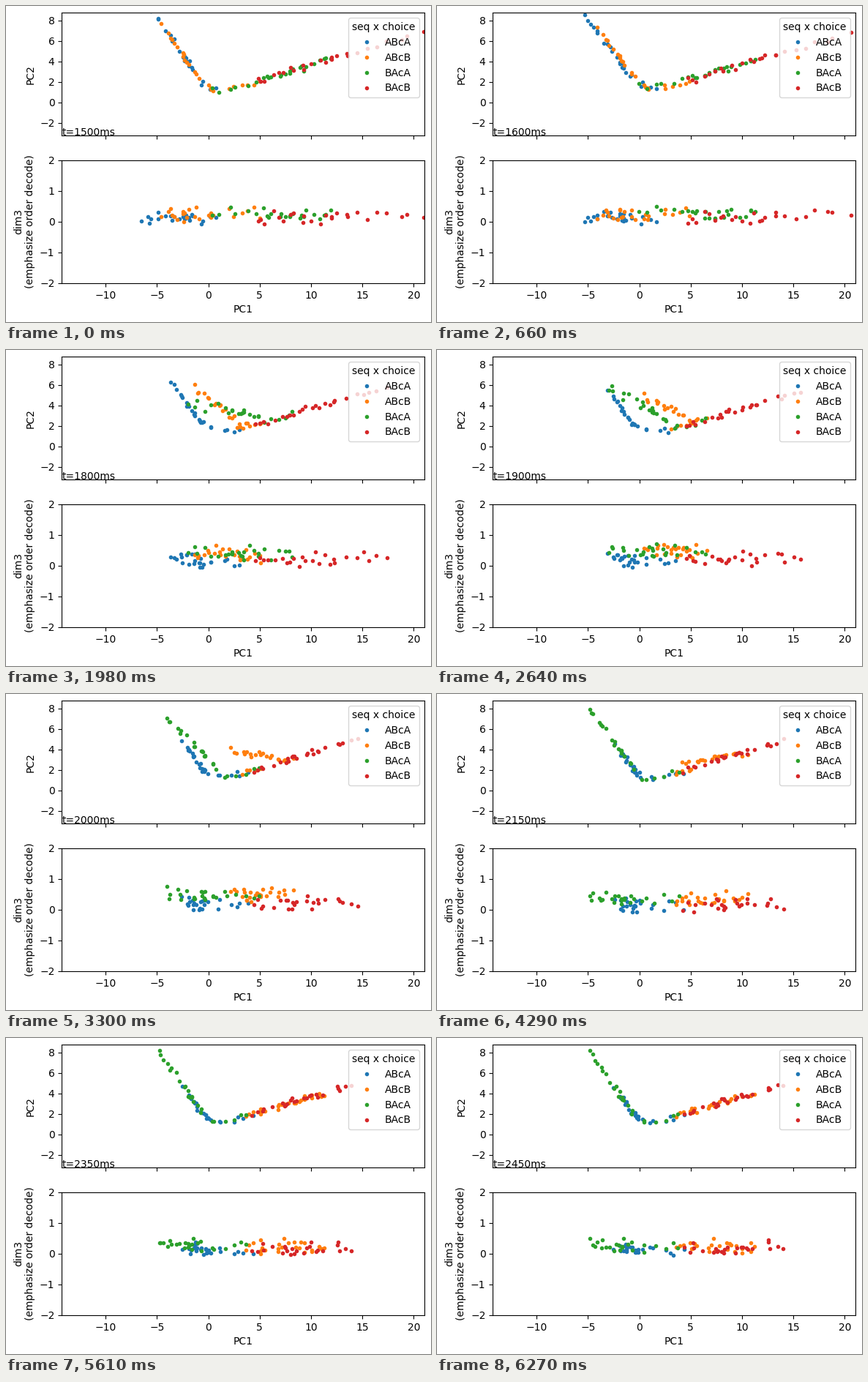
A matplotlib script that plays this animation: 581x432 px, repeating every 7.6 s.

```python
import numpy as np
import matplotlib.pyplot as plt
from matplotlib.animation import FuncAnimation

W, H = 581, 432
TICK, HOLD, LOOP = 40, 330, 7600
STEPS = 20
COUNT = 25  # points per group

rng = np.random.default_rng(7)
steps = np.arange(STEPS)[:, None]


def smooth(p):
    return p * p * (3 - 2 * p)


def ease_out(p):
    return 1 - (1 - p) ** 2


def valley(x):
    """Steep left arm and gentle right arm, blended into one curve."""
    soft = 0.65
    left, right = 1.2 - 1.4 * x, 0.75 + 0.29 * x
    return soft * np.logaddexp(left / soft, right / soft)


def spread(quartiles):
    """Points spaced along five quartiles, with a little scatter inside."""
    u = np.linspace(0, 4, COUNT)
    jitter = rng.normal(0, 0.3, COUNT)
    jitter[[0, -1]] = 0
    return np.interp(u, range(5), quartiles) + jitter


def wobble(size):
    """Slow drift, different for every point."""
    phase = rng.uniform(0, 2 * np.pi, COUNT)
    speed = rng.uniform(0.3, 0.7, COUNT)
    return size * np.sin(phase + speed * steps)


def place_axes(top):
    return fig.add_axes([76.2 / W, 1 - (top + 168) / H, 496 / W, 168 / H])


fig = plt.figure(figsize=(W / 100, H / 100), dpi=100)
upper = place_axes(9.2)
lower = place_axes(210.8)

for ax in (upper, lower):
    ax.set_xticks(range(-10, 21, 5))
    ax.set_xlim(-14.26, 21.05)
upper.tick_params(labelbottom=False)
upper.set_yticks(range(-2, 9, 2))
upper.set_ylim(-3.24, 8.74)
upper.set_ylabel("PC2")
lower.set_yticks(range(-2, 3))
lower.set_ylim(-2, 2)
lower.set_ylabel("dim3\n(emphasize order decode)")
lower.set_xlabel("PC1")

groups = []


def add_group(name, color, start, end, ease, length, level, bump, shift=0):
    """Move points from start to end in `length` steps.

    `level` and `bump` give the resting height and mid-way rise of dim3,
    `shift` moves each point's rank within the end positions.
    """
    x0, x1 = spread(start), np.roll(spread(end), -shift)
    y0, y1 = (valley(x) + rng.normal(0, 0.12, COUNT) for x in (x0, x1))
    p = ease(np.clip(steps / length, 0, 1))
    x = x0 + (x1 - x0) * p + wobble(0.12)
    y = y0 + (y1 - y0) * p + wobble(0.15)
    rise = bump * np.exp(-((steps - 9) / 4) ** 2)
    z = level + rise + rng.normal(0, 0.07, COUNT) + wobble(0.13)

    style = dict(marker=".", linestyle="none", color=color)
    top, = upper.plot([], [], label=name, **style)
    bottom, = lower.plot([], [], **style)
    groups.append((top, bottom, x, y, z))


add_group("ABcA", "tab:blue", [-6.4, -4.1, -2.3, -1.6, 0.6],
          [-1.8, -1.1, -0.6, 0.2, 4.3], ease_out, 14, 0.15, 0.05)
add_group("ABcB", "tab:orange", [-4.5, -2.5, -1.6, 0.9, 5.0],
          [3.6, 5.5, 7.6, 9.4, 11.3], smooth, 16, 0.25, 0.28, shift=5)
add_group("BAcA", "tab:green", [0.3, 5.4, 7.4, 9.4, 11.8],
          [-4.6, -3.0, -1.9, -0.7, 3.8], smooth, 13, 0.23, 0.27)
add_group("BAcB", "tab:red", [4.9, 8.0, 11.1, 14.5, 21.0],
          [4.3, 7.4, 8.7, 10.6, 14.0], smooth, 12, 0.20, 0.03)

upper.legend(title="seq x choice", loc="upper right")
clock = upper.text(0, 0, "", transform=upper.transAxes)


def update(frame):
    # the last step stays on until the loop ends
    step = min((frame * TICK + TICK - 1) // HOLD, STEPS - 1)
    clock.set_text(f"t={1500 + 50 * step}ms")
    for top, bottom, x, y, z in groups:
        top.set_data(x[step], y[step])
        bottom.set_data(x[step], z[step])
    return [clock] + [line for group in groups for line in group[:2]]


anim = FuncAnimation(fig, update, frames=LOOP // TICK, interval=TICK,
                     repeat=True, repeat_delay=0)
plt.show()
```
